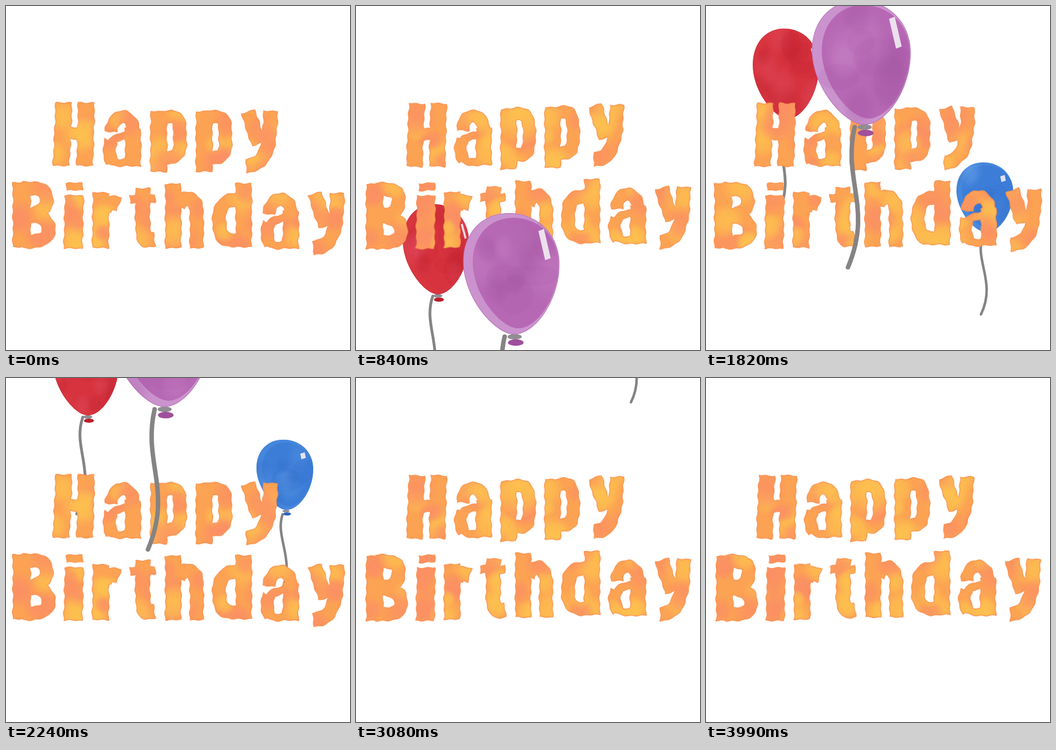
Animation, 618 px wide and 618 px high, one loop 4200 ms. Source, as an HTML page with a canvas:

```html
<!DOCTYPE html>
<html lang="en">
<head>
<meta charset="utf-8">
<title>Happy Birthday</title>
<style>
html, body { margin: 0; width: 100%; height: 100%; overflow: hidden; background: #fff; }
canvas { display: block; width: 618px; height: 618px; }
</style>
</head>
<body>
<canvas id="stage" width="618" height="618" role="img" aria-label="Happy Birthday"></canvas>
<script>
const SIZE = 618, LOOP = 4200, STEP = 70, HOLD = 210;
const ORANGE = '#fca253', YELLOW = '#fdc24e', SALMON = '#fb8f64', EDGE = '#f8904f';
const GAP = 14;
const stage = document.getElementById('stage').getContext('2d');

function seeded(seed) {
  let s = (seed * 7919 + 101) % 2147483647;
  return () => (s = s * 16807 % 2147483647) / 2147483647;
}

function sheet() {
  const canvas = document.createElement('canvas');
  canvas.width = canvas.height = SIZE;
  return canvas.getContext('2d');
}

function wash(c, x, y, r, color, alpha) {
  const g = c.createRadialGradient(x, y, 0, x, y, r);
  g.addColorStop(0, color);
  g.addColorStop(0.5, color + 'c0');
  g.addColorStop(1, color + '00');
  c.globalAlpha = alpha;
  c.fillStyle = g;
  c.fillRect(x - r, y - r, 2 * r, 2 * r);
  c.globalAlpha = 1;
}

// ---- lettering: brush strokes, each a pen width and a path ----
const glyph = (w, h, drop, ...strokes) => ({ w, h, drop, strokes });
const GLYPHS = {
  H: glyph(75, 116, 0, [30, 'M20 1L15 115M60 1L57 115'], [22, 'M20 57H57']),
  a: glyph(70, 103, 1, [29, 'M54 34V102'], [23, 'M15 40C17 6 50 4 55 36M15 56C10 68 10 80 17 94'],
    [14, 'M54 47C34 46 20 50 13 62M14 90C24 98 42 98 54 90']),
  p: glyph(67, 113, 11, [30, 'M16 3V112'], [24, 'M22 14C48 10 54 14 54 48C54 84 50 88 24 86']),
  y: glyph(66, 114, 12, [26, 'M13 3L32 62M53 2C53 60 48 100 10 101']),
  B: glyph(77, 122, 1, [32, 'M16 2V119'],
    [25, 'M18 13C50 10 60 16 60 32C60 50 50 57 24 60M24 62C54 60 64 72 64 86C64 104 52 108 18 108']),
  i: glyph(36, 119, 0, [14, 'M5 8L35 7'], [34, 'M19 23L17 119']),
  r: glyph(49, 102, 0, [30, 'M17 1L16 101'], [27, 'M22 32C28 16 38 18 49 22']),
  t: glyph(54, 110, 0, [27, 'M29 1C29 50 25 92 36 95L50 93'], [15, 'M5 21L51 20']),
  h: glyph(70, 119, 0, [29, 'M15 2V118'], [25, 'M24 46C28 24 57 18 57 56V118']),
  d: glyph(73, 120, 0, [29, 'M57 2V117'], [25, 'M56 34C24 28 13 40 13 72C13 104 26 108 56 104'])
};
const ROWS = [
  { text: 'Happy', left: 84, right: 488, base: 288 },
  { text: 'Birthday', left: 12, right: 608, base: 436 }
];
// Five hand-lettered takes: shift of the row's left and right end, drop and tilt.
const TAKES = [
  { left: 0, right: 0, drop: 0, tilt: 0 },
  { left: -3, right: -2, drop: 4, tilt: -9 },
  { left: 2, right: -3, drop: 2, tilt: -6 },
  { left: 3, right: -5, drop: 2, tilt: -9 },
  { left: 6, right: -7, drop: 3, tilt: -15 }
];

function layout({ text, left, right, base }, take) {
  const shapes = [...text].map(ch => GLYPHS[ch]);
  const natural = shapes.reduce((sum, g) => sum + g.w + GAP, -GAP);
  const scale = (right + take.right - left - take.left) / natural;
  let pen = 0;
  return shapes.map(g => {
    const x = left + take.left + pen * scale;
    const y = base + g.drop - g.h + take.drop + take.tilt * (pen + g.w / 2) / natural;
    pen += g.w + GAP;
    return { g, x, y, scale };
  });
}

// Shifts thin slices to roughen the outlines.
function roughen(from, phase, upright) {
  const to = sheet();
  for (let k = 0; k < SIZE; k++) {
    const d = 0.8 * Math.sin(k * 0.31 + phase) + 0.6 * Math.sin(k * 0.13 + phase * 2);
    if (upright) to.drawImage(from.canvas, k, 0, 1, SIZE, k, d, 1, SIZE);
    else to.drawImage(from.canvas, 0, k, SIZE, 1, d, k, SIZE, 1);
  }
  return to;
}

function letterMask(spots, phase) {
  const c = sheet();
  c.lineJoin = 'round';
  for (const { g, x, y, scale } of spots) {
    c.setTransform(scale, 0, 0, 1, x, y);
    for (const [pen, path] of g.strokes) {
      c.lineWidth = pen;
      c.stroke(new Path2D(path));
    }
  }
  return roughen(roughen(c, phase), phase + 1, true);
}

function paintWords(take, pose) {
  const spots = ROWS.flatMap(row => layout(row, take));
  const mask = letterMask(spots, pose * 2), paint = sheet(), rnd = seeded(pose + 3);
  paint.fillStyle = ORANGE;
  paint.fillRect(0, 0, SIZE, SIZE);
  for (const { g, x, y } of spots) {
    for (let i = 0; i < 6; i++) {
      const tint = rnd() < 0.5 ? YELLOW : SALMON;
      wash(paint, x + g.w * rnd(), y + g.h * rnd(), g.h * (0.15 + 0.22 * rnd()), tint, 0.8);
    }
  }
  paint.globalCompositeOperation = 'destination-in';
  for (const [dx, dy] of [[-1, 0], [1, 0], [0, -1], [0, 1]]) {
    paint.drawImage(mask.canvas, dx * 1.4, dy * 1.4);
  }
  mask.globalCompositeOperation = 'source-in';
  mask.fillStyle = EDGE;
  mask.fillRect(0, 0, SIZE, SIZE);
  mask.globalCompositeOperation = 'source-over';
  mask.drawImage(paint.canvas, 0, 0);
  return mask.canvas;
}

const words = TAKES.map(paintWords);

// ---- balloons: top at time zero, speed in px per ms ----
const EGG = new Path2D('M0 .4C0 .16 .2 0 .47 0C.78 0 1 .18 1 .42C1 .72 .75 1 .53 1C.33 1 0 .7 0 .4');
const red = {
  mid: 143.5, w: 119, h: 162, swell: 0, start: 626.5, speed: 0.322, pen: 5,
  tone: '#d8353f', inner: '#d6333f', light: '#e5546a', deep: '#b91f2b',
  gloss: 'M.89 .22L.95 .38', shine: 0.03, knot: [147, 9],
  string: [138, 3, 118, 60, 165, 100, 127, 177]
};
const purple = {
  mid: 279, w: 181, h: 228, swell: 10, start: 699.5, speed: 0.39, pen: 8,
  tone: '#cb93ce', inner: '#b768b4', light: '#cb8bca', deep: '#9f509c',
  gloss: 'M.81 .14L.88 .38', shine: 0.06, knot: [285, 14],
  string: [267, 4, 245, 100, 300, 150, 255, 256]
};
const blue = {
  mid: 501, w: 102, h: 126, swell: 0, start: 1018, speed: 0.405, pen: 4.5,
  tone: '#4587dc', inner: '#3c7dd8', light: '#6ba6ea', deep: '#2d66c2',
  gloss: 'M.81 .19L.83 .27', shine: 0.08, knot: [503, 7],
  string: [497, 8, 482, 50, 522, 90, 494, 147]
};

function oval(c, x, y, rx, ry, color) {
  c.fillStyle = color;
  c.beginPath();
  c.ellipse(x, y, rx, ry, 0, 0, 2 * Math.PI);
  c.fill();
}

function paintString({ string: s, pen }, y) {
  stage.beginPath();
  stage.moveTo(s[0], y + s[1]);
  stage.bezierCurveTo(s[2], y + s[3], s[4], y + s[5], s[6], y + s[7]);
  stage.lineWidth = pen;
  stage.lineCap = 'round';
  stage.strokeStyle = '#858383';
  stage.stroke();
}

function paintBalloon(b, time, pose) {
  const c = stage, rnd = seeded(pose + b.mid);
  const grow = b.swell * Math.cos(2 * Math.PI * (pose - 1.4) / 5);
  const w = b.w + grow * 0.8, h = b.h + grow;
  const top = b.start - time * b.speed, bottom = top + h, x = b.mid - w / 2;
  const [kx, kr] = b.knot;
  if (top > SIZE || bottom + 270 < 0) return;

  paintString(b, bottom);
  oval(c, kx, bottom + kr * 0.3, kr * 0.9, kr * 0.35, '#8f8d92');
  oval(c, kx + 2, bottom + kr * 1.05, kr, kr * 0.42, b.deep);

  // Inside the body, x and y run from 0 to 1.
  c.save();
  c.translate(x, top);
  c.scale(w, h);
  c.clip(EGG);
  c.fillStyle = b.tone;
  c.fillRect(0, 0, 1, 1);
  c.save();
  c.translate(0.1, 0.04);
  c.scale(0.89, 0.91);
  c.fillStyle = b.inner;
  c.fill(EGG);
  c.restore();
  for (let i = 0; i < 9; i++) {
    const tint = i % 2 ? b.light : b.deep;
    wash(c, rnd(), 0.1 + 0.8 * rnd(), 0.12 + 0.16 * rnd(), tint, 0.3);
  }
  c.globalAlpha = 0.12;
  for (let i = 0; i < 4; i++) {
    oval(c, 0.25 + 0.6 * rnd(), 0.15 + 0.6 * rnd(), 0.1 + 0.2 * rnd(), 0.08 + 0.15 * rnd(), b.deep);
  }
  c.globalAlpha = 0.35;
  c.strokeStyle = b.deep;
  c.lineWidth = 0.012;
  c.stroke(EGG);
  c.globalAlpha = 0.9;
  c.strokeStyle = '#f3eef4';
  c.lineWidth = b.shine;
  c.lineCap = 'butt';
  c.stroke(new Path2D(b.gloss));
  c.restore();
}

function draw(time) {
  const pose = Math.floor(time / HOLD) % TAKES.length;
  stage.fillStyle = '#fff';
  stage.fillRect(0, 0, SIZE, SIZE);
  paintBalloon(red, time, pose);
  paintBalloon(blue, time, pose);
  stage.drawImage(words[pose], 0, 0);
  paintBalloon(purple, time, pose);
}

const start = performance.now();
let shown = -1;
function tick() {
  const step = Math.floor((performance.now() - start) % LOOP / STEP);
  if (step !== shown) draw((shown = step) * STEP);
  requestAnimationFrame(tick);
}
tick();
</script>
</body>
</html>
```
